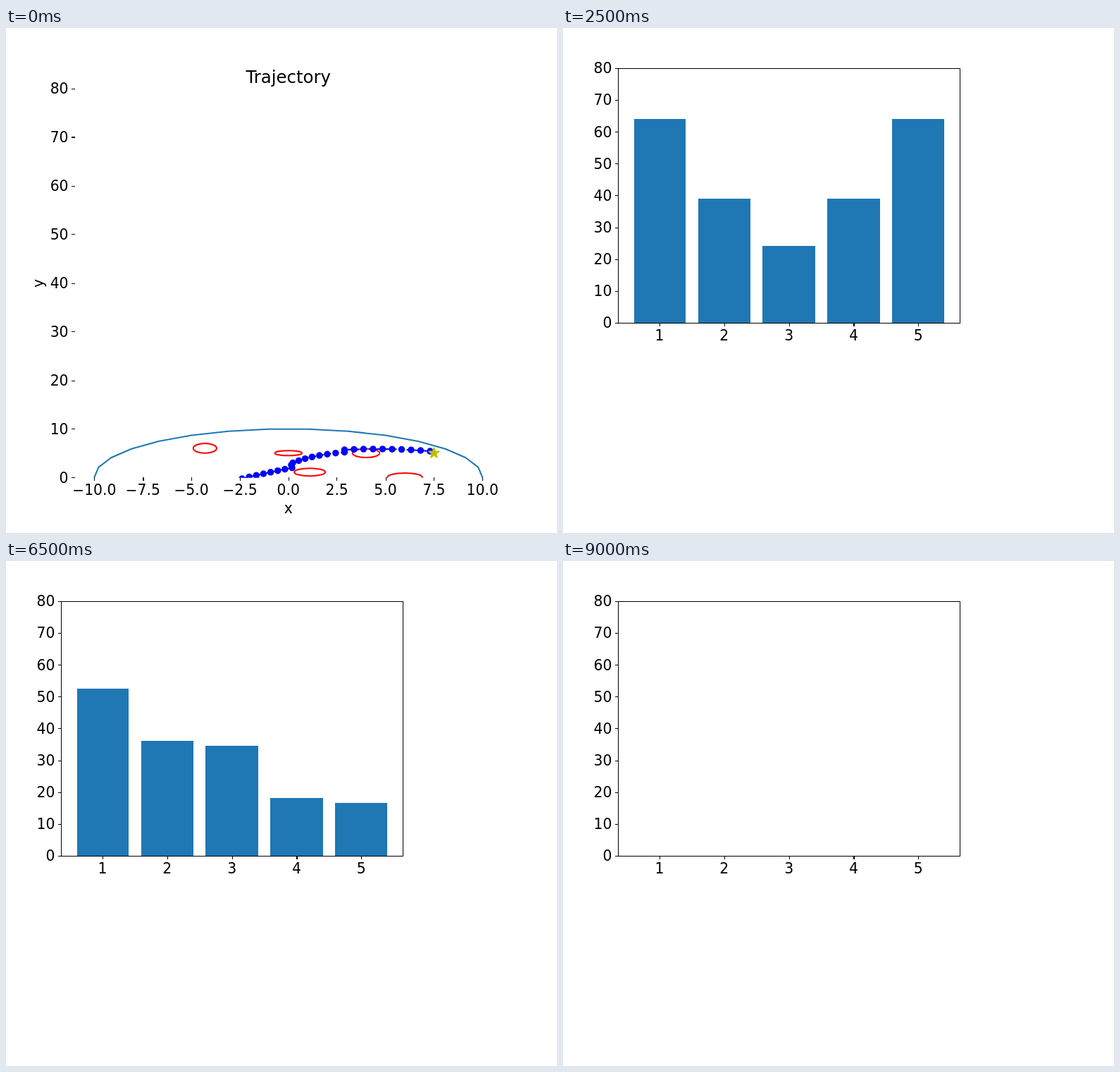
Animation of 782 by 716 pixels, one loop 9600 ms. Source, as an HTML page:

```html
<!DOCTYPE html>
<html lang="en">
<head>
<meta charset="utf-8">
<title>Trajectory and bars</title>
<style>
  html, body { margin: 0; width: 100%; height: 100%; overflow: hidden; background: #fff; }
  svg { display: block; width: 782px; height: 716px; }
  text { font: 20.83px "DejaVu Sans", sans-serif; text-anchor: middle; }
  .end { text-anchor: end; }
  .title { font-size: 25px; }
  .axis { fill: none; stroke: #000; stroke-width: 1.11; shape-rendering: crispEdges; }
  .bar { fill: #1f77b4; shape-rendering: crispEdges; }
  .line { fill: none; stroke-width: 2.08; stroke-linejoin: round; }
</style>
</head>
<body>
<svg viewBox="0 0 800 732" preserveAspectRatio="none">
  <clipPath id="area"><rect x="100" y="88" width="620" height="564"/></clipPath>
  <g id="plot"></g>
  <g id="chart" visibility="hidden"></g>
</svg>
<script>
const NS = 'http://www.w3.org/2000/svg';
const plot = document.getElementById('plot');
const chart = document.getElementById('chart');

function add(parent, tag, attrs, text) {
  const el = document.createElementNS(NS, tag);
  for (const k in attrs) el.setAttribute(k, attrs[k]);
  if (text !== undefined) el.textContent = text;
  return parent.appendChild(el);
}
const range = (n, f) => Array.from({ length: n }, (_, i) => f(i));
const snap = v => Math.round(v) + 0.5;

function xTick(parent, x, y, label) {
  add(parent, 'path', { class: 'axis', d: `M${snap(x)} ${y}v4.86` });
  add(parent, 'text', { x, y: Math.round(y + 25.6) }, label);
}
function yTick(parent, x, y, label) {
  add(parent, 'path', { class: 'axis', d: `M${x} ${snap(y)}h-4.86` });
  add(parent, 'text', { class: 'end', x: x - 9.4, y: Math.round(y + 7.6) }, label);
}

// Trajectory plot
const UX = 620 / 22, UY = 7.0455;
const px = x => 410 + UX * x;
const py = y => 651.48 - UY * y;
const toPlot = ([x, y]) => [px(x), py(y)];

for (let v = 0; v <= 80; v += 10) yTick(plot, 100, py(v), v);
for (let v = -10; v <= 10; v += 2.5)
  xTick(plot, px(v), 651.48, v.toFixed(1).replace('-', '\u2212'));
add(plot, 'text', { x: 410, y: 703 }, 'x');
add(plot, 'text', { transform: 'translate(54 370) rotate(-90)' }, 'y');
add(plot, 'text', { class: 'title', x: 410, y: 80 }, 'Trajectory');

const scene = add(plot, 'g', { 'clip-path': 'url(#area)' });
const dome = range(31, i => {
  const a = i * Math.PI / 15;
  return toPlot([10 * Math.cos(a), 10 * Math.sin(a)]);
});
add(scene, 'polyline', { class: 'line', stroke: '#1f77b4', points: dome.join(' ') });

// Obstacles: centre and radii
[[-4.3, 6, 0.6, 1], [0, 5, 0.7, 0.5], [1.1, 1.1, 0.8, 0.8], [4, 5, 0.7, 0.9], [6, 0, 0.9, 0.9]]
  .forEach(([x, y, rx, ry]) => add(scene, 'ellipse', {
    class: 'line', stroke: '#f00', cx: px(x), cy: py(y), rx: UX * rx, ry: UY * ry
  }));

// n points along a quadratic curve from a to b, bent towards c
const curve = (n, a, c, b) => range(n, i => {
  const t = i / (n - 1), s = 1 - t;
  return [0, 1].map(k => s * s * a[k] + 2 * s * t * c[k] + t * t * b[k]);
});
const path = [
  ...curve(8, [-2.39, -0.26], [-1.1, 0.98], [0.19, 1.99]),
  [0.15, 2.57],
  ...curve(8, [0.23, 3.01], [1.25, 4.64], [2.89, 5.19]),
  ...curve(10, [2.89, 5.69], [5.1, 6.13], [7.3, 5.4])
].map(toPlot);
add(scene, 'polyline', {
  class: 'line', stroke: '#00f', 'stroke-dasharray': '7.7 3.3', points: path.join(' ')
});
path.forEach(([cx, cy]) => add(scene, 'circle', { cx, cy, r: 4.86, fill: '#00f' }));

const star = range(10, i => {
  const r = i % 2 ? 3.18 : 8.33, a = i * Math.PI / 5;
  return [px(7.5) + r * Math.sin(a), py(5) - r * Math.cos(a)];
});
add(scene, 'polygon', {
  points: star.join(' '), fill: '#bfbf00', stroke: '#bfbf00',
  'stroke-width': 1.39, 'stroke-linejoin': 'bevel'
});

// Bar chart
const BASE = 427;
const bx = x => 80 + 496 / 5.28 * (x - 0.36);
const by = v => 427.2 - 4.62 * v;

const bars = range(5, i => {
  const left = Math.round(bx(i + 0.6)), right = Math.round(bx(i + 1.4));
  return add(chart, 'rect', { class: 'bar', x: left, width: right - left });
});
for (let n = 1; n <= 5; n++) xTick(chart, bx(n), 427.5, n);
for (let v = 0; v <= 80; v += 10) yTick(chart, 80.5, by(v), v);
add(chart, 'rect', { class: 'axis', x: 80.5, y: 58.5, width: 496, height: 369 });

// Bar heights by index i and distance d from the middle bar
const shapes = [
  () => 0,
  (i, d) => 60 - 35 * d + 5 * d * d,
  (i, d) => 20 + 15 * d + 5 * d * d,
  i => 10 + 10 * i,
  i => 50 - 10 * i,
  i => i % 2 ? 0 : 75,
  () => 0
];
const LOOP = 9600, TICK = 100, STEPS = 10, PERIOD = 16;

function draw(t) {
  const tick = Math.floor(t / TICK) - 1;
  plot.setAttribute('visibility', tick < 0 ? 'visible' : 'hidden');
  chart.setAttribute('visibility', tick < 0 ? 'hidden' : 'visible');
  if (tick < 0) return;
  const seg = Math.floor(tick / PERIOD);
  const k = Math.min(STEPS, tick % PERIOD + 1) / STEPS;
  bars.forEach((bar, i) => {
    const d = Math.abs(i - 2);
    const from = shapes[seg](i, d), to = shapes[seg + 1](i, d);
    const top = Math.round(by(from + (to - from) * k));
    bar.setAttribute('y', top);
    bar.setAttribute('height', BASE - top);
  });
}

const start = performance.now();
function loop() {
  draw((performance.now() - start) % LOOP);
  requestAnimationFrame(loop);
}
loop();
</script>
</body>
</html>
```
